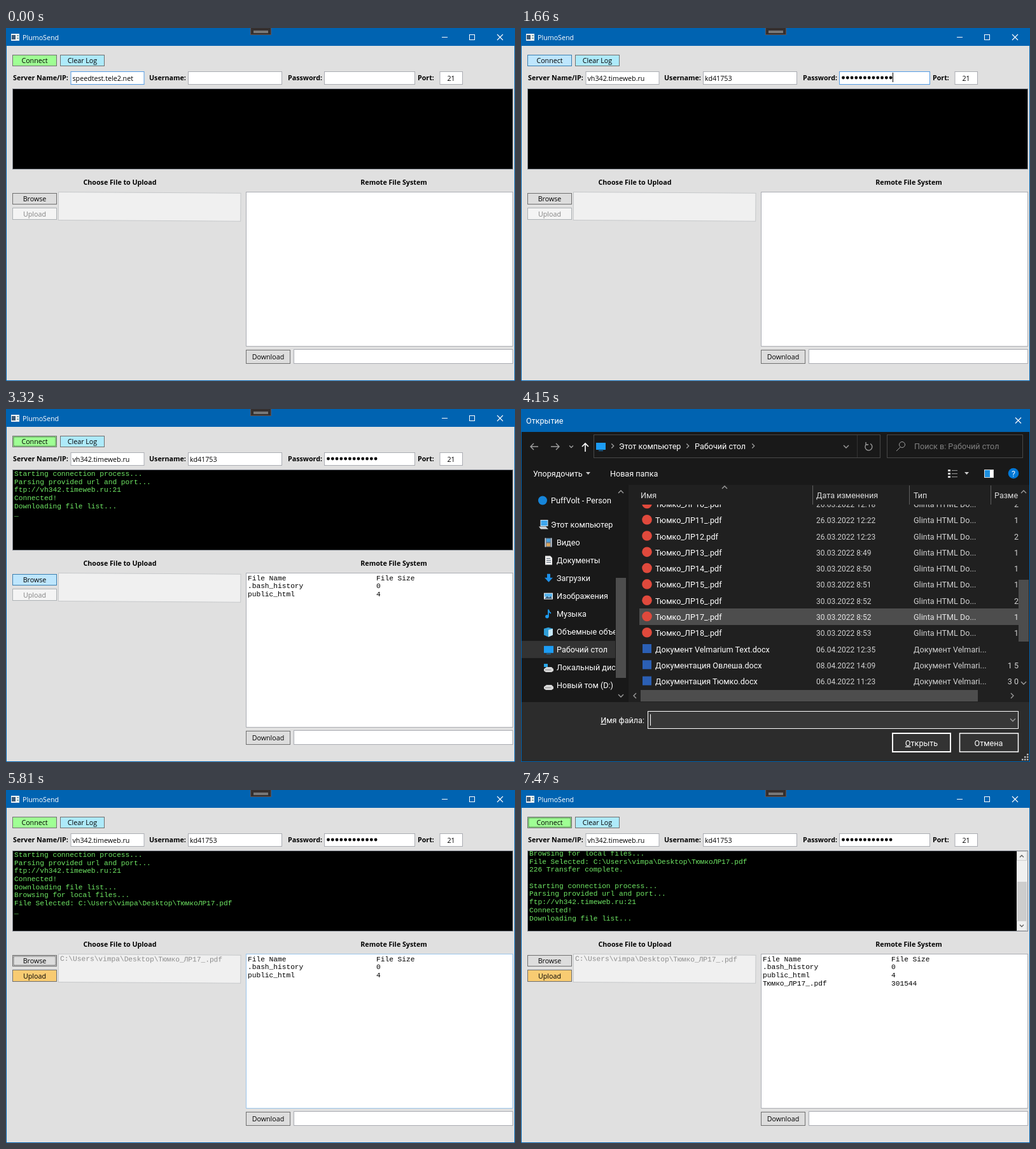
Write an HTML page that moves like this. It is 800 by 554 pixels and loops after 8000 ms.

```html
<!DOCTYPE html>
<html lang="en">
<head>
<meta charset="utf-8">
<title>FTP client</title>
<style>
  html, body { margin: 0; width: 100%; height: 100%; overflow: hidden; }
  svg { display: block; }
  text { white-space: pre; }
  .ui { font: 10.7px "Open Sans", sans-serif; }
  .bold { font: bold 10.7px "Open Sans", sans-serif; }
  .mono { font: 11.2px "Liberation Mono", monospace; }
  .dlg { font: 12.6px Roboto, sans-serif; }
  .date { font: 12px Roboto, sans-serif; }
</style>
</head>
<body>
<svg id="stage" width="800" height="554" viewBox="0 0 800 554"></svg>
<script>
const STEP = 830, LOOP = 8000;
const BLUE = '#0063b1', HOVER = '#bee6fd', GRAY = '#ddd', GREEN = '#9fff94', LIME = '#6fe864';
const PERSON = 'Тюмко', HOST = 'vh342.timeweb.ru', USER = 'kd41753';
const FOLDER = 'C:\\Users\\vimpa\\Desktop\\';

// Drawing helpers, each returning SVG markup
const box = (x, y, w, h, fill, stroke = 'none', more = '') =>
  `<rect x="${x}" y="${y}" width="${w}" height="${h}" fill="${fill}" stroke="${stroke}" ${more}/>`;
const line = (d, stroke, width = 1, fill = 'none') =>
  `<path d="${d}" stroke="${stroke}" stroke-width="${width}" fill="${fill}"/>`;
const shape = (d, fill) => `<path d="${d}" fill="${fill}"/>`;
const dot = (x, y, r, fill) => `<circle cx="${x}" cy="${y}" r="${r}" fill="${fill}"/>`;
const text = (s, x, y, cls = 'ui', fill = '#000', anchor = 'start') =>
  `<text x="${x}" y="${y}" class="${cls}" fill="${fill}" text-anchor="${anchor}">${s}</text>`;
const clip = (x, y, w, h, body) =>
  `<svg x="${x}" y="${y}" width="${w}" height="${h}" viewBox="${x} ${y} ${w} ${h}" overflow="hidden">${body}</svg>`;
const chevron = (x, y, turn, color, s = 4) =>
  `<path transform="translate(${x} ${y}) rotate(${turn})" d="M${-s} ${s / 2}L0 ${-s / 2}L${s} ${s / 2}" fill="none" stroke="${color}" stroke-width="1.3"/>`;
const cross = (x, y) => line(`M${x} ${y}l9 9m0 -9l-9 9`, '#fff', 1.1);

function button(label, y, h, fill, { x = 10.5, focus = false, disabled = false } = {}) {
  const edge = disabled ? '#adb2b5' : fill === HOVER ? '#3c7fb1' : '#707070';
  return box(x, y, 69, h, fill, edge)
    + (focus ? box(x + 1.5, y + 1.5, 66, h - 3, 'none', '#222', 'stroke-dasharray="1 1"') : '')
    + text(label, x + 34.5, y + h / 2 + 4, 'ui', disabled ? '#838383' : '#000', 'middle');
}

function field(x, w, value, focus, caretX) {
  return box(x, 68.5, w, 20, '#fff', focus ? '#569de5' : '#abadb3')
    + text(value, x + 2.5, 83)
    + (caretX ? line(`M${caretX} 70v15`, '#000') : '');
}

const connectLog = ['Starting connection process...', 'Parsing provided url and port...',
  `ftp://${HOST}:21`, 'Connected!', 'Downloading file list...'];
const pickLog = ['Browsing for local files...', `File Selected: ${FOLDER}${PERSON}ЛР17.pdf`];
const sentLog = [...pickLog, '226 Transfer complete.'];

function logPanel(step) {
  const scrolled = step === 9;
  let lines = [];
  if (step >= 3) lines = [...connectLog, '_'];
  if (step >= 7) lines = [...connectLog, ...pickLog, '_'];
  if (step >= 8) lines = [...connectLog, ...sentLog, '_'];
  if (scrolled) lines = [...sentLog, '', ...connectLog];
  const top = scrolled ? 103 : 105;
  let out = box(10.5, 95.5, 786, 126, '#000', '#828790')
    + clip(11, 96, 785, 125, lines.map((s, i) => text(s, 13, top + i * 12.69, 'mono', LIME)).join(''));
  if (scrolled) {
    out += box(779, 96, 17, 125, '#f0f0f0') + box(780, 144, 15, 61, '#cdcdcd')
      + box(779.5, 96.5, 15, 14, '#f0f0f0', '#d0d0d0') + box(779.5, 205.5, 15, 15, '#f0f0f0', '#d0d0d0')
      + chevron(787, 104, 0, '#606060', 3) + chevron(787, 213, 180, '#606060', 3);
  }
  return out;
}

function remoteList(step) {
  const rows = [['File Name', 'File Size'], ['.bash_history', 0], ['public_html', 4]];
  if (step === 9) rows.push([PERSON + '_ЛР17_.pdf', 301544]);
  return box(377.5, 257.5, 419, 242, '#fff', step === 7 ? '#9cc5ea' : '#abadb3')
    + (step < 3 ? '' : rows.map(([name, size], i) => {
      const y = 268.5 + i * 12.69;
      return text(name, 380, y, 'mono') + text(size, 582, y, 'mono');
    }).join(''));
}

function mainWindow(step) {
  const picked = step >= 7;
  const connectFill = step === 2 || step === 3 ? HOVER : GREEN;
  let out = box(0, 0, 800, 554, BLUE) + box(1, 28, 798, 525, '#e0e0e0')
    + box(8, 9, 13, 11, '#f4f4f4') + box(9, 11, 6, 7, '#3b5a78') + box(17, 11, 3, 2, '#8aa') + box(17, 15, 3, 2, '#8aa')
    + text('PlumoSend', 26, 18.5, 'ui', '#fff')
    + box(384.5, -.5, 32, 11, '#352f2e', '#655450') + box(389, 4, 23, 4, '#777')
    + line('M685 14.5h9', '#fff') + box(728.5, 10.5, 8, 8, 'none', '#fff') + cross(772, 10);

  out += button('Connect', 42.5, 17, connectFill, { focus: step === 3 || step === 4 || step === 9 })
    + button('Clear Log', 42.5, 17, '#aeeafa', { x: 85.5 })
    + text('Server Name/IP:', 11, 82, 'bold') + field(102, 115, step ? HOST : 'speedtest.tele2.net', !step)
    + text('Username:', 225, 82, 'bold') + field(286.5, 147, step ? USER : '', step === 1, step === 1 && 333.5)
    + text('Password:', 443, 82, 'bold') + field(500.5, 142, '', step === 2, step === 2 && 584.5)
    + text('Port:', 647, 82, 'bold') + field(682, 35.5, '', false) + text('21', 699.5, 83, 'ui', '#000', 'middle');
  if (step >= 2) for (let i = 0; i < 12; i++) out += dot(506.5 + i * 6.78, 78, 2.4, '#000');

  out += logPanel(step)
    + text('Choose File to Upload', 179, 246, 'bold', '#000', 'middle')
    + text('Remote File System', 609.5, 246, 'bold', '#000', 'middle')
    + button('Browse', 259.5, 17, step === 4 ? HOVER : GRAY, { focus: step === 7 })
    + button('Upload', 282.5, 18, !picked ? '#f4f4f4' : step === 8 ? HOVER : '#f8cb72', { disabled: !picked, focus: step === 8 })
    + `<g transform="rotate(.36 82.5 257.5)">${box(82.5, 257.5, 286.5, 44, '#f0f0f0', '#c6c8ca')}`
    + (picked ? text(`${FOLDER}${PERSON}_ЛР17_.pdf`, 85, 268, 'mono', '#8c8c8c') : '') + '</g>'
    + remoteList(step)
    + button('Download', 505.5, 21, GRAY, { x: 377.5 })
    + box(452.5, 504.5, 344, 22, '#fff', '#abadb3');
  return out;
}

const screenIcon = (x, y) => box(x, y, 15, 11, '#1c9cf4') + line(`M${x + 4} ${y + 12.5}h7`, '#1679c0');
const diskIcon = (x, y) => shape(`M${x} ${y + 5}l4 -3h8l3 3v3l-3 2h-9l-3 -2z`, '#d8d8d8') + line(`M${x + 2} ${y + 6.5}h9`, '#888');
const sideIcons = [
  y => dot(34, y, 7, '#1685d9'),
  y => box(31, y - 7, 11, 9, '#3ea6ee', '#cfe6f6') + shape(`M28 ${y + 3}h11l4 4h-12z`, '#d4d8dc'),
  y => box(37, y - 7, 12, 14, '#68788a') + box(40, y - 6, 6, 5, '#4aa3df') + box(40, y + 1, 6, 5, '#d9a45c')
    + line(`M38.5 ${y - 7}v14m9 -14v14`, '#ddd', 1),
  y => shape(`M38 ${y - 7}h8l3 3v11h-11z`, '#eee') + line(`M40 ${y - 3}h6m-6 3h7m-7 3h7`, '#567'),
  y => shape(`M41 ${y - 7}h5v6h4l-6.5 7l-6.5 -7h4z`, '#1e90e8'),
  y => box(36, y - 5, 14, 10, '#eee') + box(37, y - 4, 12, 5, '#55b4ee') + shape(`M37 ${y + 4}l4 -4l3 2l3 -2l2 4z`, '#355f80'),
  y => dot(41, y + 4, 2.8, '#1e9cf0') + line(`M43 ${y + 4}v-11q1 4 4 6`, '#1e9cf0', 1.8),
  y => shape(`M36 ${y - 5}l7 -2l7 2v10l-7 3l-7 -3z`, '#2e9ed8') + shape(`M43 ${y - 3}l7 -2v10l-7 3z`, '#c7e8f7'),
  y => screenIcon(36, y - 6),
  y => diskIcon(36, y - 3) + box(36, y - 6, 6, 5, '#28a8ea'),
  y => diskIcon(36, y - 3),
];
const sideNames = ['PuffVolt - Person', 'Этот компьютер', 'Видео', 'Документы', 'Загрузки', 'Изображения',
  'Музыка', 'Объемные объекты', 'Рабочий стол', 'Локальный диск', 'Новый том (D:)'];

const pdf = (n, tail, date, size) => [`${PERSON}_ЛР${n}${tail}.pdf`, date, 'Glinta HTML Do...', size];
const doc = (name, date, size) => [name + '.docx', date, 'Документ Velmari...', size];
const files = [
  pdf(10, '_', '26.03.2022 12:18', 2), pdf(11, '_', '26.03.2022 12:22', 1), pdf(12, '', '26.03.2022 12:23', 2),
  pdf(13, '_', '30.03.2022 8:49', 1), pdf(14, '_', '30.03.2022 8:50', 1), pdf(15, '_', '30.03.2022 8:51', 1),
  pdf(16, '_', '30.03.2022 8:52', 2), pdf(17, '_', '30.03.2022 8:52', 1), pdf(18, '_', '30.03.2022 8:53', 1),
  doc('Документ Velmarium Text', '06.04.2022 12:35', ''), doc('Документация Овлеша', '08.04.2022 14:09', '1 5'),
  doc('Документация ' + PERSON, '06.04.2022 11:23', '3 0'),
];

function fileList(selected) {
  const rows = files.map(([name, date, type, size], i) => {
    const y = 149.5 + i * 25.28, base = y + 4.5, dim = i === 7 ? '#e4e4e4' : '#d0d0d0';
    return (i === 7 ? box(186, 313, 596, 26, selected ? '#777' : '#4d4d4d') : '')
      + (i < 9 ? dot(198, y - 1, 7.8, '#e0493c') : box(191, y - 8, 14, 14, '#2b5fb4'))
      + text(name, 211, base, 'dlg', '#fff') + text(date, 464, base, 'date', dim)
      + clip(611, y - 13, 122, 26, text(type, 617, base, 'dlg', dim)) + text(size, 782, base, 'dlg', dim, 'end');
  });
  return clip(170, 150, 612, 290, rows.join(''));
}

function dialog(selected) {
  const white = '#fff', soft = '#a0a0a0', thumb = '#4d4d4d', edge = '#484848';
  let out = box(0, 0, 800, 554, BLUE) + box(1, 36, 798, 517, '#191919') + box(169, 119, 630, 341, '#202020')
    + text('Открытие', 8, 23, 'dlg', white) + cross(777, 13.5);

  // Navigation bar
  out += line('M27 59H15m5 -5l-5 5l5 5M47 59h13m-5 -5l5 5l-5 5', soft, 1.4) + chevron(79, 59, 180, soft, 3)
    + line('M101 67V54m-5 5l5 -5l5 5', white, 1.6)
    + box(114.5, 40.5, 450, 36, '#191919', edge) + line('M528.5 41v35', '#333') + screenIcon(118, 53)
    + chevron(144, 58, 90, soft, 3.5) + text('Этот компьютер', 154, 63, 'dlg', white)
    + chevron(262, 58, 90, soft, 3.5) + text('Рабочий стол', 273, 63, 'dlg', white)
    + (selected ? '' : chevron(365, 58, 90, soft, 3.5)) + chevron(511, 59, 180, soft)
    + line('M549 54.5A5.5 5.5 0 1 1 542.5 55.5M542 52v4h4', soft, 1.3)
    + box(575.5, 40.5, 213, 36, '#191919', edge)
    + `<circle cx="599" cy="56" r="4.5" fill="none" stroke="${soft}"/>` + line('M596 60l-6 6', soft)
    + text('Поиск в: Рабочий стол', 618, 63, 'dlg', '#808080');

  // Toolbar
  out += text('Упорядочить', 19, 106, 'dlg', white) + shape('M102 99h7l-3.5 4z', '#ccc')
    + text('Новая папка', 140, 106, 'dlg', white)
    + [95, 100, 105].map(y => box(671, y, 4, 3, '#ccc') + line(`M677 ${y + 1.5}h9`, '#999')).join('')
    + shape('M697 99h7l-3.5 4z', '#ccc') + box(728.5, 95.5, 14, 12, '#1c8fe0', '#ddd') + box(737, 96, 5, 11, '#fff')
    + dot(774, 101, 8.3, '#0078d7') + text('?', 774, 105.5, 'dlg', white, 'middle');

  // Folder tree
  const tree = sideNames.map((name, i) => {
    const y = i ? 181.5 + (i - 1) * 28.05 : 143.5;
    return (i === 8 ? box(1, y - 14, 147, 27, '#333') : '') + sideIcons[i](y)
      + text(name, i < 2 ? 47 : 56, y + 4.5, 'dlg', white);
  });
  out += clip(1, 119, 147, 341, tree.join('')) + box(149, 265, 16, 157, thumb)
    + chevron(157, 130, 0, soft) + chevron(157, 450, 180, soft);

  // File table and scroll bars
  out += text('Имя', 188, 140, 'dlg', '#ddd') + text('Дата изменения', 464, 140, 'dlg', '#ddd')
    + text('Тип', 617, 140, 'dlg', '#ddd') + clip(739, 120, 43, 30, text('Размер', 744, 140, 'dlg', '#ddd'))
    + line('M458.5 120v30M610.5 120v30M738.5 120v30', '#606060') + chevron(320, 123, 0, soft)
    + fileList(selected)
    + box(782, 268, 16, 97, thumb) + chevron(790, 130, 0, soft) + chevron(790, 430, 180, soft)
    + box(188, 441, 530, 18, thumb) + chevron(179, 450, -90, soft) + chevron(772, 450, 90, soft);

  // Footer
  const u = s => `<tspan text-decoration="underline">${s[0]}</tspan>${s.slice(1)}`;
  out += box(1, 460, 798, 93, '#2c2c2c') + text(u('Имя файла:'), 194, 493, 'dlg', white, 'end')
    + box(199.5, 474.5, 582, 27, '#383838', selected ? '#999' : white) + chevron(773, 488, 180, soft)
    + (selected ? text(PERSON + '_ЛР17_.pdf', 202, 493, 'dlg', white) : line('M203.5 479v18', white))
    + box(584, 509, 91, 29, selected ? '#484848' : '#333', white, 'stroke-width="2"')
    + text(u('Открыть'), 629.5, 528.5, 'dlg', white, 'middle')
    + box(689.5, 509, 92, 29, '#333', white, 'stroke-width="1.5"') + text('Отмена', 735, 528.5, 'dlg', white, 'middle');
  for (let i = 0; i < 3; i++) for (let j = 0; j <= i; j++) out += box(795 - j * 4, 541 + i * 4, 2.5, 2.5, '#bbb');
  return out;
}

const stage = document.getElementById('stage');
let shown = -1;
function tick() {
  const step = Math.floor(performance.now() % LOOP / STEP);
  if (step !== shown) {
    shown = step;
    stage.innerHTML = step === 5 || step === 6 ? dialog(step === 6) : mainWindow(step);
  }
  requestAnimationFrame(tick);
}
tick();
</script>
</body>
</html>
```
